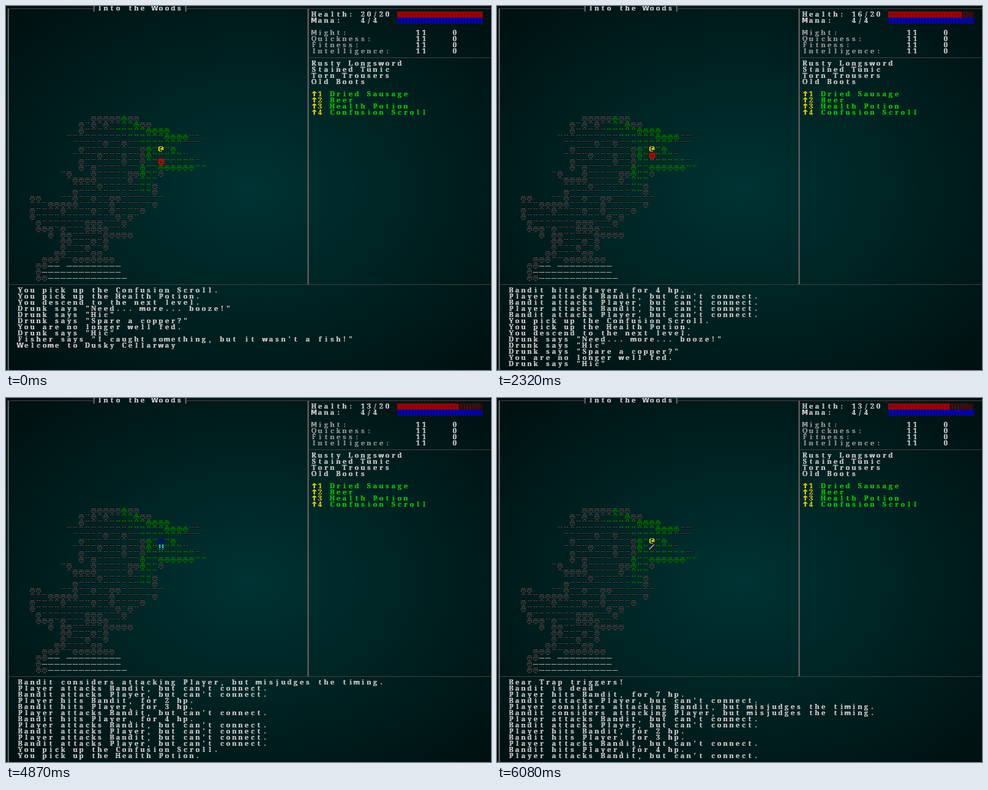
Write an HTML page with a canvas that moves like this. It is 634 px wide and 475 px high and loops after 8 s.

```html
<!DOCTYPE html>
<html lang="en">
<head>
<meta charset="utf-8">
<title>Into the Woods</title>
<style>
  html, body { margin: 0; width: 100%; height: 100%; overflow: hidden; background: #001414; }
  canvas { display: block; }
</style>
</head>
<body>
<canvas id="stage" width="634" height="475"></canvas>
<script>
const ctx = document.getElementById('stage').getContext('2d');
const LOOP = 8000;
const CELL = 8;
const SERIF = 'bold 9px "Noto Serif", serif';
const WIDE = 'bold 8.5px "DejaVu Sans", sans-serif';

const WHITE = [255, 255, 255], LABEL = [204, 204, 204], FRAME = [153, 153, 153];
const RED = [255, 0, 0], BLUE = [0, 0, 255], GREEN = [0, 255, 0], YELLOW = [255, 255, 0];
const CYAN = [0, 255, 255], ORANGE = [255, 165, 0], PINK = [255, 192, 203];
const LEAF = [0, 153, 0], FADED = [109, 109, 109], ROAD = [236, 236, 236];

// Glyphs as [x, y, w, h] boxes inside one cell; overlaps become holes.
const TREE = [[2, 0, 3, 1], [1, 1, 5, 1], [2, 2, 3, 1], [0, 3, 7, 2], [0, 5, 2, 1],
  [3, 5, 1, 1], [5, 5, 2, 1], [3, 6, 1, 1], [2, 7, 3, 1]];
const GRASS = [[1, 0, 2, 3], [4, 0, 2, 3]];
const SLAB = [[0, 4, 7, 1]];
const FACE = [[1, 0, 6, 1], [0, 1, 8, 6], [1, 7, 6, 1],
  [2, 2, 1, 1], [5, 2, 1, 1], [2, 4, 4, 1], [3, 5, 2, 1]];
const HERO = [[1, 0, 5, 1], [0, 1, 2, 5], [5, 1, 2, 1], [3, 2, 4, 3], [1, 6, 4, 1]];
const BANG = [[1, 0, 2, 5], [5, 0, 2, 5], [1, 6, 2, 1], [5, 6, 2, 1]];
const ARROW = [[3, 0, 2, 1], [2, 1, 4, 1], [1, 2, 6, 1], [3, 3, 2, 4]];
const BLADE = Array.from({ length: 7 }, (_, i) => [Math.max(0, 5 - i), i, i < 6 ? 2 : 1, 1]);

const TILES = {
  T: [TREE, FADED], t: [TREE, LEAF],
  '.': [GRASS, FADED], ',': [GRASS, LEAF],
  '-': [SLAB, ROAD]
};

const MAP_TOP = 18;
const MAP = [
  '              TTTTTtTT',
  '            T.T.T..,,tTT',
  '            T.....,,,,,tttt',
  '          ..........,,,,,,tttt..',
  '           .....T..T..,,,,,,,...',
  '            T.........Tt,,,t',
  '           ....T...T..Tt,,,,,.',
  '            T......T..T,,,,,,,,.',
  '            T.T.......t,,tttttt,,',
  '         .T   T.....TTt,,T',
  '          .TTTT.....T.,,,',
  '           ....T......,,T',
  '           T..........,,T',
  '    TT   ..T..T..TT.......',
  '    ...TTTTT.....T......T',
  '    T....T....T..T....T',
  '    T.............T.T.',
  '     T.......TTT...T.',
  '     TTT.T...TTTT...',
  '       T TT.....TTTTT',
  '         TT...T.T',
  '         T...T..T',
  '        TT....TT',
  '      TTT..TTTTTTT',
  '     TT-- ---------',
  '     T-------------',
  '     TT-------------'
];

const HERO_COL = 25, HERO_ROW = 23, FOE_ROW = 24;
const STEP_IN = 500, DEATH = 5940;

const OLD_LOG = [
  'You pick up the Confusion Scroll.',
  'You pick up the Health Potion.',
  'You descend to the next level.',
  'Drunk says "Need... more... booze!"',
  'Drunk says "Hic"',
  'Drunk says "Spare a copper?"',
  'You are no longer well fed.',
  'Drunk says "Hic"',
  'Fisher says "I caught something, but it wasn\'t a fish!"',
  'Welcome to Dusky Cellarway'
];

const miss = (a, b) => `${a} attacks ${b}, but can't connect.`;
const fumble = (a, b) => `${a} considers attacking ${b}, but misjudges the timing.`;
const hit = (a, b, n) => `${a} hits ${b}, for ${n} hp.`;
const P = 'Player', B = 'Bandit';

// Each blow: start, end of its spark, struck row, spark colour, message, damage to the player.
const BLOWS = [
  [1100, 1330, HERO_ROW, CYAN, miss(B, P), 0],
  [1560, 1790, FOE_ROW, CYAN, miss(P, B), 0],
  [1560, 1790, HERO_ROW, CYAN, miss(B, P), 0],
  [2100, 2240, FOE_ROW, CYAN, miss(P, B), 0],
  [2100, 2320, HERO_ROW, ORANGE, hit(B, P, 4), 4],
  [3710, 3940, FOE_ROW, CYAN, miss(P, B), 0],
  [3710, 3940, HERO_ROW, ORANGE, hit(B, P, 3), 3],
  [4250, 4470, FOE_ROW, ORANGE, hit(P, B, 2), 0],
  [4330, 4470, HERO_ROW, CYAN, miss(B, P), 0],
  [4870, 5010, FOE_ROW, CYAN, miss(P, B), 0],
  [4870, 5010, HERO_ROW, BLUE, fumble(B, P), 0],
  [5320, 5540, FOE_ROW, BLUE, fumble(P, B), 0],
  [5400, 5540, HERO_ROW, CYAN, miss(B, P), 0],
  [DEATH, 6080, FOE_ROW, ORANGE, hit(P, B, 7), 0]
];
const CUTS = [STEP_IN, ...BLOWS.flatMap(b => [b[0], b[1]])];

const cellX = col => col * CELL - 1;
const cellY = row => row * CELL - 1;

// Striped ink: even lines bright, odd lines dim, as on an old monitor.
const inks = new Map();
function ink(rgb) {
  if (!inks.has(rgb)) {
    const tile = document.createElement('canvas');
    tile.width = 1;
    tile.height = 2;
    const g = tile.getContext('2d');
    [32, 96].forEach((loss, y) => {
      g.fillStyle = `rgb(${rgb.map(v => Math.max(0, v - loss)).join(',')})`;
      g.fillRect(0, y, 1, 1);
    });
    inks.set(rgb, ctx.createPattern(tile, 'repeat'));
  }
  return inks.get(rgb);
}

function sprite(col, row, boxes, rgb) {
  ctx.fillStyle = ink(rgb);
  ctx.beginPath();
  for (const [x, y, w, h] of boxes) ctx.rect(cellX(col) + x, cellY(row) + y, w, h);
  ctx.fill('evenodd');
}

function print(col, row, text, rgb = WHITE) {
  ctx.fillStyle = ink(rgb);
  [...text].forEach((ch, i) => {
    if (ch === ' ') return;
    ctx.font = /[mwMW]/.test(ch) ? WIDE : SERIF;
    // The second pass firms up thin strokes.
    for (let pass = 0; pass < 2; pass++) {
      ctx.fillText(ch, cellX(col + i) + 3.5, cellY(row) + 7);
    }
  });
}

function bar(row, share, rgb) {
  const width = 14, full = Math.floor(share * width) + 1;
  ctx.fillStyle = ink(rgb);
  for (let x = 0; x < width * CELL; x++) {
    const filled = x < full * CELL;
    for (let y = 0; y < CELL; y++) {
      const dot = (x + 2 * (y & 1)) % 4 === 2;
      if (dot !== filled) ctx.fillRect(cellX(64) + x, cellY(row) + y, 1, 1);
    }
  }
}

function backdrop() {
  ctx.save();
  ctx.translate(319, 239);
  ctx.scale(640, 480);
  const glow = ctx.createRadialGradient(0, 0, 0, 0, 0, 0.75);
  glow.addColorStop(0, 'rgb(0,51,51)');
  glow.addColorStop(1, 'rgb(0,13,13)');
  ctx.fillStyle = glow;
  ctx.fillRect(-0.5, -0.5, 1, 1);
  ctx.restore();
}

function frames() {
  const title = 'Into the Woods', start = 15, end = start + title.length;
  ctx.fillStyle = ink(FRAME);
  ctx.fillRect(2, 3, 2, 472);
  ctx.fillRect(394, 3, 2, 361);
  ctx.fillRect(2, 3, cellX(start) - 6, 1);
  ctx.fillRect(cellX(end) + 3, 3, 634, 1);
  ctx.fillRect(394, 67, 240, 1);
  ctx.fillRect(2, 363, 632, 1);
  for (const col of [start - 1, end]) ctx.fillRect(cellX(col) + 3, cellY(0), 2, CELL);
  print(start, 0, title);
}

function panel(hp) {
  print(50, 1, `Health: ${hp}/20`);
  print(50, 2, 'Mana:   4/4');
  bar(1, hp / 20, RED);
  bar(2, 1, BLUE);
  ['Might:', 'Quickness:', 'Fitness:', 'Intelligence:'].forEach((name, i) => {
    print(50, 4 + i, name, LABEL);
    print(67, 4 + i, '11');
    print(73, 4 + i, '0');
  });
  ['Rusty Longsword', 'Stained Tunic', 'Torn Trousers', 'Old Boots']
    .forEach((name, i) => print(50, 9 + i, name));
  ['Dried Sausage', 'Beer', 'Health Potion', 'Confusion Scroll'].forEach((name, i) => {
    sprite(50, 14 + i, ARROW, YELLOW);
    print(51, 14 + i, String(i + 1), YELLOW);
    print(53, 14 + i, name, GREEN);
  });
}

function world(t) {
  const foeRow = t < STEP_IN ? FOE_ROW + 1 : FOE_ROW;
  const actors = {
    [HERO_ROW]: [HERO, YELLOW],
    [foeRow]: t < DEATH ? [FACE, RED] : [BLADE, PINK]
  };
  for (const [from, to, row, rgb] of BLOWS) {
    if (t >= from && t < to) actors[row] = [BANG, rgb];
  }
  MAP.forEach((line, i) => {
    const row = MAP_TOP + i;
    [...line].forEach((ch, col) => {
      const look = (col === HERO_COL && actors[row]) || TILES[ch];
      if (look) sprite(col, row, ...look);
    });
  });
}

function draw(t) {
  const past = BLOWS.filter(b => b[0] <= t);
  const hp = past.reduce((rest, b) => rest - b[5], 20);
  const log = past.map(b => b[4]);
  if (t >= DEATH) log.push('Bandit is dead', 'Bear Trap triggers!');

  backdrop();
  frames();
  panel(hp);
  world(t);
  [...log.reverse(), ...OLD_LOG].slice(0, 13).forEach((line, i) => print(2, 46 + i, line));
}

ctx.textAlign = 'center';
ctx.textBaseline = 'alphabetic';

let shown = -1;
function tick() {
  const t = performance.now() % LOOP;
  const step = CUTS.filter(c => c <= t).length;
  if (step !== shown) {
    shown = step;
    draw(t);
  }
  requestAnimationFrame(tick);
}
tick();
</script>
</body>
</html>
```
